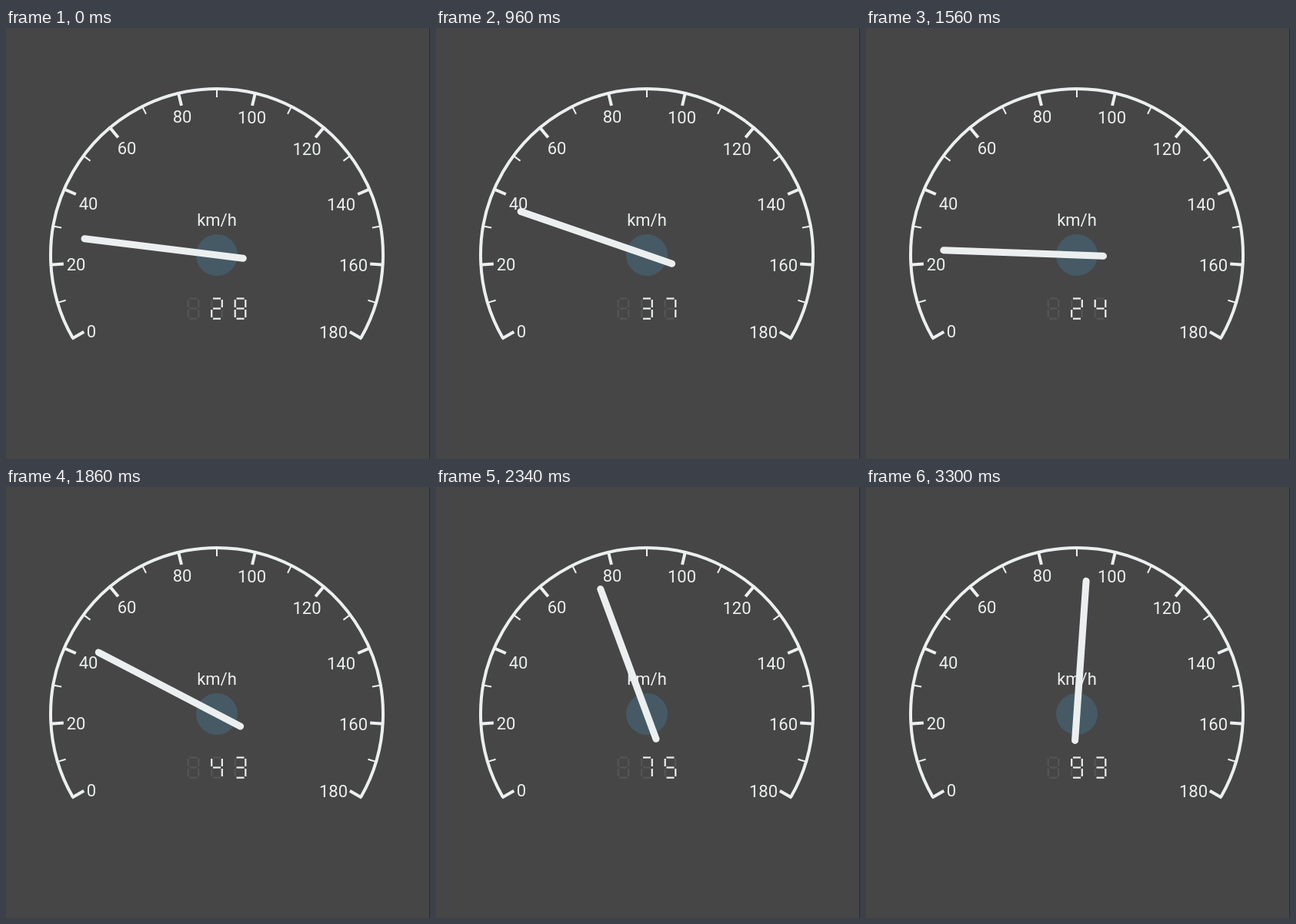
Write an HTML page that moves like this. It is 551 by 560 pixels and loops after 3.54 s.

```html
<!DOCTYPE html>
<html lang="en">
<head>
<meta charset="utf-8">
<title>Speedometer</title>
<style>
  html, body { margin: 0; width: 100%; height: 100%; overflow: hidden; background: #464646; }
  svg { display: block; width: 551px; height: 560px; }
  text { font: 22px Roboto, sans-serif; fill: #eceff0; text-anchor: middle; }
  .line { fill: none; stroke: #eceff0; }
</style>
</head>
<body>
<svg id="stage" viewBox="0 0 551 560">
  <rect width="551" height="560" fill="#464646"/>
  <rect x="550" width="1" height="560" fill="#2b2b2b"/>
  <g id="dial"></g>
  <circle cx="274" cy="295" r="27" fill="#465a65"/>
  <text x="274" y="257">km/h</text>
  <g id="display"></g>
  <line id="needle" class="line" x1="100.7" y1="295" x2="308.5" y2="295" stroke-width="9" stroke-linecap="round"/>
</svg>
<script>
const CX = 274, CY = 295, RADIUS = 216;
const LOOP = 3540, STEP = 60;
const DEG_PER_UNIT = 240 / 180, START = -30;

// [time in ms, needle angle in degrees above the left horizontal]
const keys = [
  [0, 7.06], [480, 21.75], [540, 23.8], [660, 27.3], [720, 27.3],
  [960, 19.04], [1080, 15], [1140, 15], [1560, 2.06], [1680, 12.1],
  [2100, 48.1], [2220, 59], [2580, 90.96]
];

const $ = id => document.getElementById(id);

function add(parent, tag, attrs, text) {
  const el = document.createElementNS("http://www.w3.org/2000/svg", tag);
  for (const name in attrs) el.setAttribute(name, attrs[name]);
  if (text !== undefined) el.textContent = text;
  parent.appendChild(el);
  return el;
}

function polar(degrees, r) {
  const a = degrees * Math.PI / 180;
  return [CX - r * Math.cos(a), CY - r * Math.sin(a)];
}

function buildDial() {
  const dial = $("dial");
  const arc = `M${polar(START, RADIUS)}A${RADIUS} ${RADIUS} 0 1 1 ${polar(START + 240, RADIUS)}`;
  add(dial, "path", { class: "line", d: arc, "stroke-width": 4 });
  for (let value = 0; value <= 180; value += 10) {
    const major = value % 20 === 0;
    const angle = START + value * DEG_PER_UNIT;
    add(dial, "path", {
      class: "line",
      d: `M${polar(angle, RADIUS + 1.5)}L${polar(angle, major ? 199.5 : 205)}`,
      "stroke-width": major ? 4 : 2
    });
  }
  const labels = [
    [111, 402], [91, 315], [107, 235.5], [157, 163.5], [229, 123],
    [319.5, 124], [391, 164.5], [435.5, 237], [451.5, 315.5], [425.5, 402.5]
  ];
  labels.forEach(([x, y], i) => add(dial, "text", { x, y }, i * 20));
}

// Segments in the order a to g: top, upper right, lower right, bottom, lower left, upper left, middle
const segments = [
  "M3 1.5H13", "M14.8 3V13", "M14.8 16V26", "M3 27.7H13", "M1.2 16V26", "M1.2 3V13", "M3 14.5H13"
];
const glyphs = ["abcdef", "bc", "abdeg", "abcdg", "bcfg", "acdfg", "acdefg", "abc", "abcdefg", "abcdfg"];

function buildDisplay() {
  return [235.5, 266, 296.5].map(x => {
    const cell = add($("display"), "g", { transform: `translate(${x} 350)`, "stroke-width": 2.2 });
    return segments.map(d => add(cell, "path", { d }));
  });
}

function angleAt(t) {
  if (t >= 3300) return 94;
  if (t >= 3000) return 92.5;
  const i = keys.findIndex(key => key[0] > t);
  if (i < 0) return keys[keys.length - 1][1];
  const [t0, a0] = keys[i - 1], [t1, a1] = keys[i];
  return a0 + (a1 - a0) * (t - t0) / (t1 - t0);
}

function showNumber(value) {
  const digits = String(value).padStart(3, " ");
  cells.forEach((cell, i) => {
    const lit = digits[i] === " " ? "" : glyphs[digits[i]];
    cell.forEach((seg, s) => seg.setAttribute("stroke", lit.includes("abcdefg"[s]) ? "#eceff0" : "#555"));
  });
}

function render(time) {
  const t = Math.floor((time % LOOP) / STEP) * STEP;
  const angle = angleAt(t);
  $("needle").setAttribute("transform", `rotate(${angle} ${CX} ${CY})`);
  showNumber(Math.round((angle - START) / DEG_PER_UNIT));
}

buildDial();
const cells = buildDisplay();
const begin = performance.now();
function tick() {
  render(performance.now() - begin);
  requestAnimationFrame(tick);
}
tick();
</script>
</body>
</html>
```
